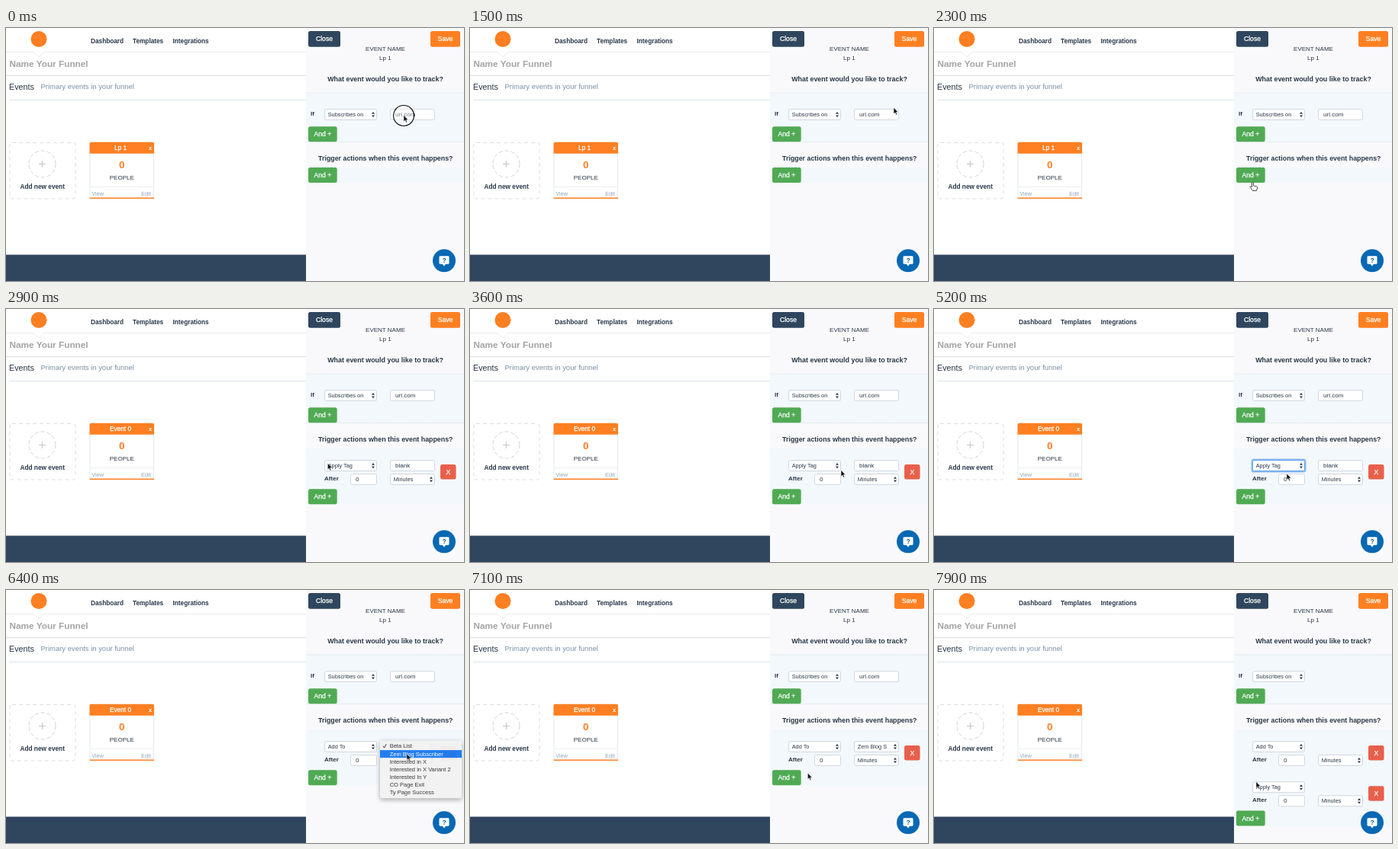
An HTML page for the animation above (8000 ms loop, 600 by 332 pixels).

```html
<!DOCTYPE html>
<html lang="en">
<head>
<meta charset="utf-8">
<style>
  html, body { margin: 0; width: 100%; height: 100%; overflow: hidden; background: #fff; }
  svg { display: block; width: 600px; height: 332px; font-family: "Liberation Sans", Arial, sans-serif; }
  .menu { filter: drop-shadow(0 2px 3px rgba(0, 0, 0, .35)); }
</style>
</head>
<body>
<svg viewBox="0 0 600 332"><g id="base"></g><g id="live"></g></svg>
<script>
const LOOP = 8000, ROW = 53.3;
const NAVY = '#2f465e', ORANGE = '#ff7f22', GREEN = '#50aa54', INK = '#293748';

const text = (x, y, s, size, fill = INK, extra = '') =>
  `<text x="${x}" y="${y}" font-size="${size}" fill="${fill}" ${extra}>${s}</text>`;
const bold = (x, y, s, size, fill = INK, extra = '') => text(x, y, s, size, fill, 'font-weight="700" ' + extra);
const MID = 'text-anchor="middle"';
// White medium-weight label, centred on x
const label = (x, y, s, size) => text(x, y, s, size, '#fff', MID + ' stroke="#fff" stroke-width=".25"');
const rect = (x, y, w, h, fill, extra = '') =>
  `<rect x="${x}" y="${y}" width="${w}" height="${h}" fill="${fill}" ${extra}/>`;
const path = (d, extra) => `<path d="${d}" ${extra}/>`;
const line = (x1, x2, y, color, extra = '') => path(`M${x1} ${y}H${x2}`, `stroke="${color}" ${extra}`);
const button = (x, y, w, h, s, fill) =>
  rect(x, y, w, h, fill, 'rx="2.5"') + label(x + w / 2, y + h / 2 + 3, s, 8.6);
const andButton = y => button(396, y, 37.7, 20, 'And +', GREEN);

const field = (x, y, w, s) =>
  rect(x + .5, y + .5, w - 1, 14, '#fff', 'rx="2" stroke="#d3d9e1"') + text(x + 7, y + 10, s, 8.1);
const select = (x, y, w, s, focus) =>
  (focus ? rect(x - .5, y - .5, w + 1, 16, 'none', 'rx="2.5" stroke="#8dbdf0" stroke-width="2"') : '') +
  rect(x + .5, y + .5, w - 1, 14, '#fff', `rx="2" stroke="${focus ? '#5d9fe6' : '#d0d6de'}"`) +
  text(x + 4.7, y + 10.1, s, 7.35) +
  path(`M${x + w - 7} ${y + 6.7}l2-2.7 2 2.7zm0 1.8l2 2.7 2-2.7z`, `fill="${INK}"`);

function menu(x, y, w, items, active, opacity = .96) {
  const h = items.length * 10.1 + 5;
  return `<g class="menu" opacity="${opacity}">` + rect(x, y, w, h, '#f2f2f2', 'rx="2.5"') +
    rect(x, y + 2.5 + active * 10.1, w, 10.1, '#1a7af0') +
    path(`M${x + 4} ${y + 7.2}l1.6 2.4 2.6-5`, `fill="none" stroke="${active ? '#333' : '#fff'}"`) +
    items.map((s, i) => text(x + 12.7, y + 9.9 + i * 10.1, s, 7.5, i === active ? '#fff' : '#333')).join('') + '</g>';
}

function action(y, kind, focus, value) {
  return select(417, y, 69, kind, focus) + value +
    bold(417, y + 26.6, 'After', 8.1) + field(451, y + 18, 35, '0') +
    select(503, y + 18, 59, 'Minutes') + button(569, y + 6, 20.5, 19.5, 'X', '#e8604b');
}

base.innerHTML =
  `<circle cx="43" cy="14.5" r="10.5" fill="${ORANGE}"/>` +
  bold(111, 20, 'Dashboard', 8.25) + bold(166, 20, 'Templates', 8.25) + bold(218.5, 20, 'Integrations', 8.25) +
  path('M0 31.5H36l7 6.5 7-6.5H393', 'fill="none" stroke="#ececec"') +
  bold(4.5, 51, 'Name Your Funnel', 11.8, '#a3a3a3') + line(0, 393, 62.5, '#dcdcdc') +
  text(4, 81.3, 'Events', 10.8) + text(45.5, 80.3, 'Primary events in your funnel', 9.46, '#7890a8') +
  line(4, 393, 94.5, '#dbe3ea') +
  rect(5, 150.5, 86, 73.5, 'none', 'rx="3" stroke="#dcdcdc" stroke-dasharray="5 4"') +
  '<circle cx="47.5" cy="178.5" r="17.5" fill="none" stroke="#d2d2d2" stroke-dasharray="5 3"/>' +
  path('M43 178.5h9m-4.5-4.5v9', 'stroke="#c4c4c4"') +
  bold(47.7, 211, 'Add new event', 8.3, INK, MID) +
  rect(110, 150.5, 83.5, 73, '#fff', 'rx="2" stroke="#e4e7ea"') +
  path('M109.5 164.7v-13q0-2 2-2h80.5q2 0 2 2v13z', `fill="${ORANGE}"`) +
  line(110, 194, 208.5, '#ebeef1') + line(109.5, 194, 223.3, ORANGE, 'stroke-width="1.5"') +
  bold(189, 160, 'x', 7.5, '#fff', MID) + bold(151.7, 184.3, '0', 13.4, ORANGE, MID) +
  text(151.8, 199, 'PEOPLE', 8, INK, MID) +
  text(112.3, 219.5, 'View', 7.4, '#8ea6bb') + text(177, 219.5, 'Edit', 7.4, '#8ea6bb') +
  rect(0, 297.5, 393, 34.5, NAVY) +
  rect(393, 0, 207, 332, '#f9f9fb') + rect(393, 85, 207, 64.5, '#f3f8fd') +
  line(393, 600, 85, '#d8dde3', 'stroke-dasharray="1 1"') + line(393, 600, 149.5, '#d8dde3', 'stroke-dasharray="1 1"') +
  button(396, 4, 42, 20.7, 'Close', NAVY) + button(556, 4, 39, 20.7, 'Save', ORANGE) +
  text(497, 29.7, 'EVENT NAME', 8, INK, MID) + text(497, 42, 'Lp 1', 8.1, INK, MID) +
  bold(497, 70.2, 'What event would you like to track?', 8.94, INK, MID) +
  bold(497.3, 174.2, 'Trigger actions when this event happens?', 8.85, INK, MID) +
  bold(399, 115.2, 'If', 8.1) + select(417, 106, 69, 'Subscribes on') + andButton(129.3);

const help = '<circle cx="574" cy="305.3" r="15" fill="#0868b3"/>' +
  path('M568.8 299.2h10.4q1.3 0 1.3 1.3v8q0 1.3-1.3 1.3h-3l-2.2 2.7-2.2-2.7h-3q-1.3 0-1.3-1.3v-8q0-1.3 1.3-1.3z', 'fill="#fff"') +
  bold(574, 307.6, '?', 8.6, '#0868b3', MID);

const LISTS = ['Beta List', 'Zem Blog Subscriber', 'Interested in X', 'Interested in X Variant 2',
  'Interested In Y', 'CO Page Exit', 'Ty Page Success'];

// Pointer stops: time, x, y
const STOPS = [[0, 521, 114.5], [700, 521, 114.5], [1400, 555, 104.5], [1650, 555, 104.5], [2250, 417.5, 202],
  [2800, 417.5, 202], [3500, 486, 211.5], [3700, 486, 211.5], [4150, 462, 206], [4450, 462, 206],
  [4700, 462, 216], [5300, 462, 216], [5800, 525, 206], [6050, 525, 206], [6300, 525, 215],
  [6750, 525, 215], [7250, 420, 247], [7650, 420, 247], [7850, 422, 251.5], [LOOP, 422, 251.5]];
const CLICKS = [0, 2450, 4200, 4850, 5850, 6550, 7350];

function pointer(t) {
  const i = STOPS.findIndex(s => s[0] > t), [t0, x0, y0] = STOPS[i - 1], [t1, x1, y1] = STOPS[i];
  const k = (t - t0) / (t1 - t0), e = k * k * (3 - 2 * k);
  return [x0 + (x1 - x0) * e, y0 + (y1 - y0) * e];
}

function drawPointer(t, andTop) {
  const [x, y] = pointer(t);
  const age = t - CLICKS.filter(c => c <= t).pop();
  const hand = x > 396 && x < 434 && y > andTop && y < andTop + 20;
  const ring = age < 300 ? `<circle cx="${x}" cy="${y + .5}" r="${13.5 - age / 60}" fill="#fff" fill-opacity=".35"
    stroke="#111" stroke-width="1.2" opacity="${1 - age / 300}"/>` : '';
  const shape = hand
    ? path('M-1 1q1-1.5 2 0v4l4 1q1.5.5 1 2l-1 3.5h-5l-3.5-5q.5-1.5 2.5 0z', 'fill="#fff" stroke="#222" stroke-width=".8"')
    : path('M0 0v8.2l1.9-1.7 1.3 3 1.4-.6-1.3-2.9h2.6z', 'fill="#111" stroke="#fff" stroke-width=".5"');
  return ring + `<g transform="translate(${x} ${y})">${shape}</g>`;
}

function scene(t) {
  const rows = t < 2700 ? 0 : t < 7600 ? 1 : 2;
  const addTo = t >= 5250, andTop = 183 + rows * ROW;
  let out = rect(393, 183, 207, 20.3 + rows * ROW, '#f3f8fd') +
    label(150, 160.4, rows ? 'Event 0' : 'Lp 1', 8.3);
  if (rows < 2) out += field(503, 106, 59, 'url.com');
  if (rows) {
    const value = rows > 1 ? '' : !addTo ? field(503, 198, 59, 'blank')
      : select(503, 198, 59, t < 6650 ? 'Beta List' : 'Zem Blog S');
    out += action(198, addTo ? 'Add To' : 'Apply Tag', t >= 4200 && !addTo, value);
  }
  if (rows > 1) out += action(198 + ROW, 'Apply Tag', false, '');
  out += andButton(andTop);
  const [, y] = pointer(t), active = y > 210 ? 1 : 0;
  if (t >= 4300 && t < 5200)
    out += menu(408.5, 197.5, 78, ['Apply Tag', 'Add To'], active, Math.min(.96, (5200 - t) / 200));
  if (t >= 5950 && t < 6650) out += menu(490, 197.5, 107, LISTS, active);
  return out + help + drawPointer(t, andTop);
}

const start = performance.now();
function frame() {
  live.innerHTML = scene((performance.now() - start) % LOOP);
  requestAnimationFrame(frame);
}
frame();
</script>
</body>
</html>
```
